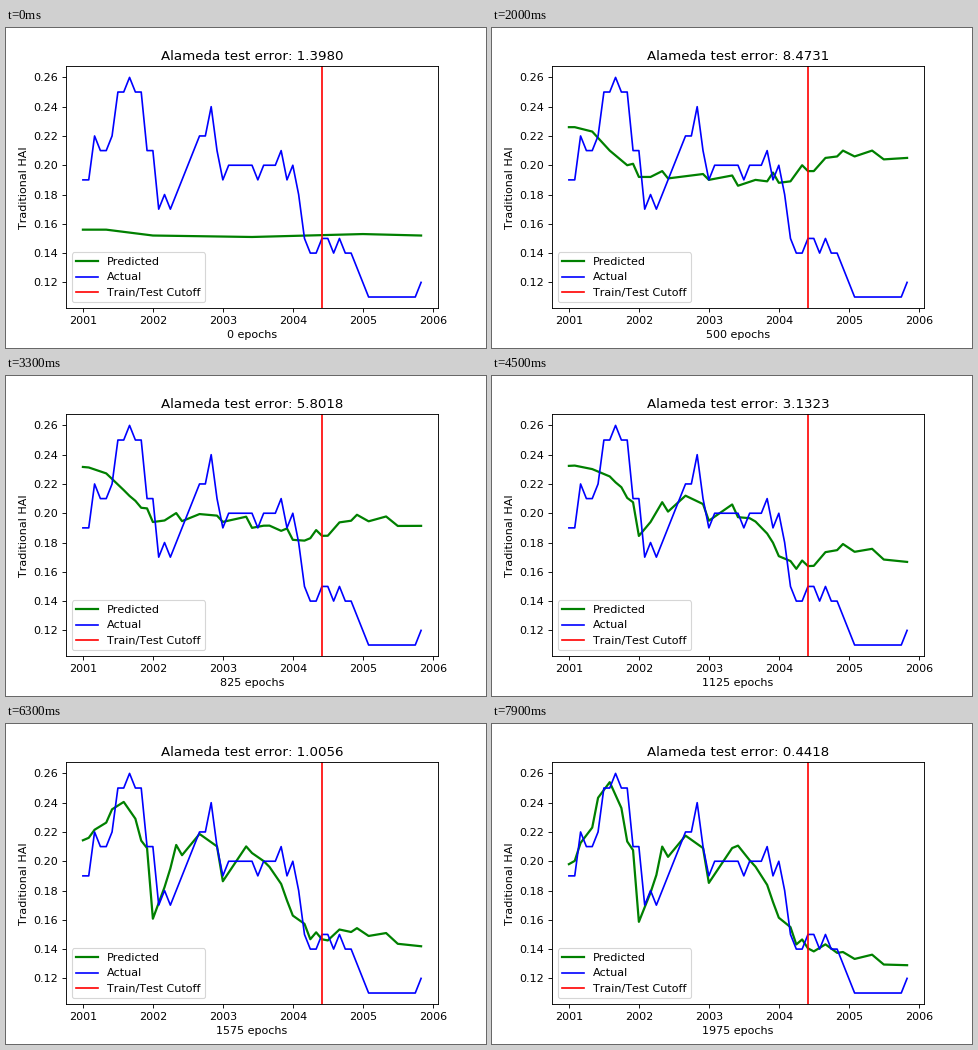
These frames come from a looping animation (480x320 px, 8 s). A matplotlib script:

```python
import numpy as np
import matplotlib.pyplot as plt
from matplotlib.animation import FuncAnimation

FRAMES, INTERVAL, EPOCHS_PER_FRAME = 80, 100, 25
WARMUP = 500  # epochs of the first, fast approach

plt.rcParams["text.kerning_factor"] = 6  # whole-pixel kerning

months = np.arange(59)
years = 2001 + months / 12

actual = np.array([
    19, 19, 22, 21, 21, 22, 25, 25, 26, 25, 25, 21, 21, 17, 18,
    *range(17, 23), 22, 24, 21, 19, *[20] * 5, 19, *[20] * 3, 21, 19,
    20, 18, 15, 14, 14, 15, 15, 14, 15, 14, 14, 13, 12, *[11] * 9, 12]) / 100


def curve(*points):
    """Monthly values from (month, thousandths) key points."""
    return np.interp(months, *zip(*points)) / 1000


def dip(month, depth):
    """A sudden drop that recovers over four months."""
    since = months - month
    return -depth / 1000 * np.where(since < 0, 0, np.clip(1 - since / 4, 0, 1))


def smooth(x, lo, hi):
    u = np.clip((x - lo) / (hi - lo), 0, 1)
    return u * u * (3 - 2 * u)


# What the model learns, in order: an average level, the yearly wave
# with its winter dips, then the early peak and the late decline.
untrained = curve((0, 156), (4, 156), (12, 152), (29, 151), (48, 153), (58, 152))
level = curve(
    (0, 226), (1, 226), (4, 223), (7, 210), (10, 200), (11, 201), (12, 192),
    (14, 192), (16, 196), (17, 191), (23, 194), (24, 190), (28, 193),
    (29, 186), (32, 190), (34, 189), (35, 195), (36, 188), (38, 189),
    (40, 200), (41, 196), (42, 196), (44, 205), (46, 206), (47, 210),
    (49, 206), (52, 210), (54, 204), (58, 205))
wave = curve(
    (0, 1), (4, 6), (7, 20), (9, 20), (11, 9), (16, 16), (17, 14), (20, 27),
    (23, 17), (28, 18), (31, 11), (34, -4), (35, -21), (38, -30), (39, -45),
    (47, -43), (58, -53))
winters = dip(12, 40) + dip(24, 20)
detail = curve(
    (0, -29), (1, -28), (2, -16), (4, -6), (5, 14), (7, 24), (9, 13),
    (10, -1), (15, -8), (16, -2), (28, -2), (29, 9), (31, 1), (38, -4),
    (44, -18), (47, -29), (58, -23))
lift = curve((0, 28), (8, 0))  # passing overshoot at the start

FIRST_ERROR = np.log(1.3980)
checkpoints = [500, 825, 1125, 1375, 1750, 1975]
log_errors = np.log([8.4731, 5.8018, 3.1323, 2.0289, 0.5441, 0.4418])


def warmth(epoch):
    return min(1, (1 - np.exp(-epoch / 160)) / (1 - np.exp(-WARMUP / 160)))


def prediction(epoch):
    w = smooth(epoch, 515, 1450)
    fit = untrained + (level - untrained) * warmth(epoch)
    fit = fit + w * wave + w**3 * winters + w * (1 - w) * lift
    return fit + smooth(epoch, 1300, 1900) * detail


def test_error(epoch):
    target = np.interp(epoch, checkpoints, log_errors)
    return np.exp(FIRST_ERROR + (target - FIRST_ERROR) * warmth(epoch))


fig, ax = plt.subplots(figsize=(6, 4), dpi=80)
fig.subplots_adjust(left=0.125, right=0.9, bottom=0.125, top=0.88)
predicted, = ax.plot(years, untrained, "g", lw=2, label="Predicted")
ax.plot(years, actual, "b", lw=1.5, label="Actual")
ax.axvline(years[41], color="r", lw=1.5, label="Train/Test Cutoff")
margin = 0.05 * (years[-1] - years[0])
ax.set_xlim(years[0] - margin, years[-1] + margin)
ax.set_ylim(0.1025, 0.2675)
ax.set_xticks(range(2001, 2007))
ax.set_yticks(np.arange(12, 27, 2) / 100)
ax.set_ylabel("Traditional HAI")
ax.legend(loc="lower left")
title = ax.set_title("")
xlabel = ax.set_xlabel("")


def update(frame):
    epoch = frame * EPOCHS_PER_FRAME
    predicted.set_ydata(prediction(epoch))
    title.set_text(f"Alameda test error: {test_error(epoch):.4f}")
    xlabel.set_text(f"{epoch} epochs")
    return predicted, title, xlabel


anim = FuncAnimation(fig, update, frames=FRAMES, interval=INTERVAL,
                     init_func=lambda: update(0), repeat=True, repeat_delay=0)
plt.show()
```
